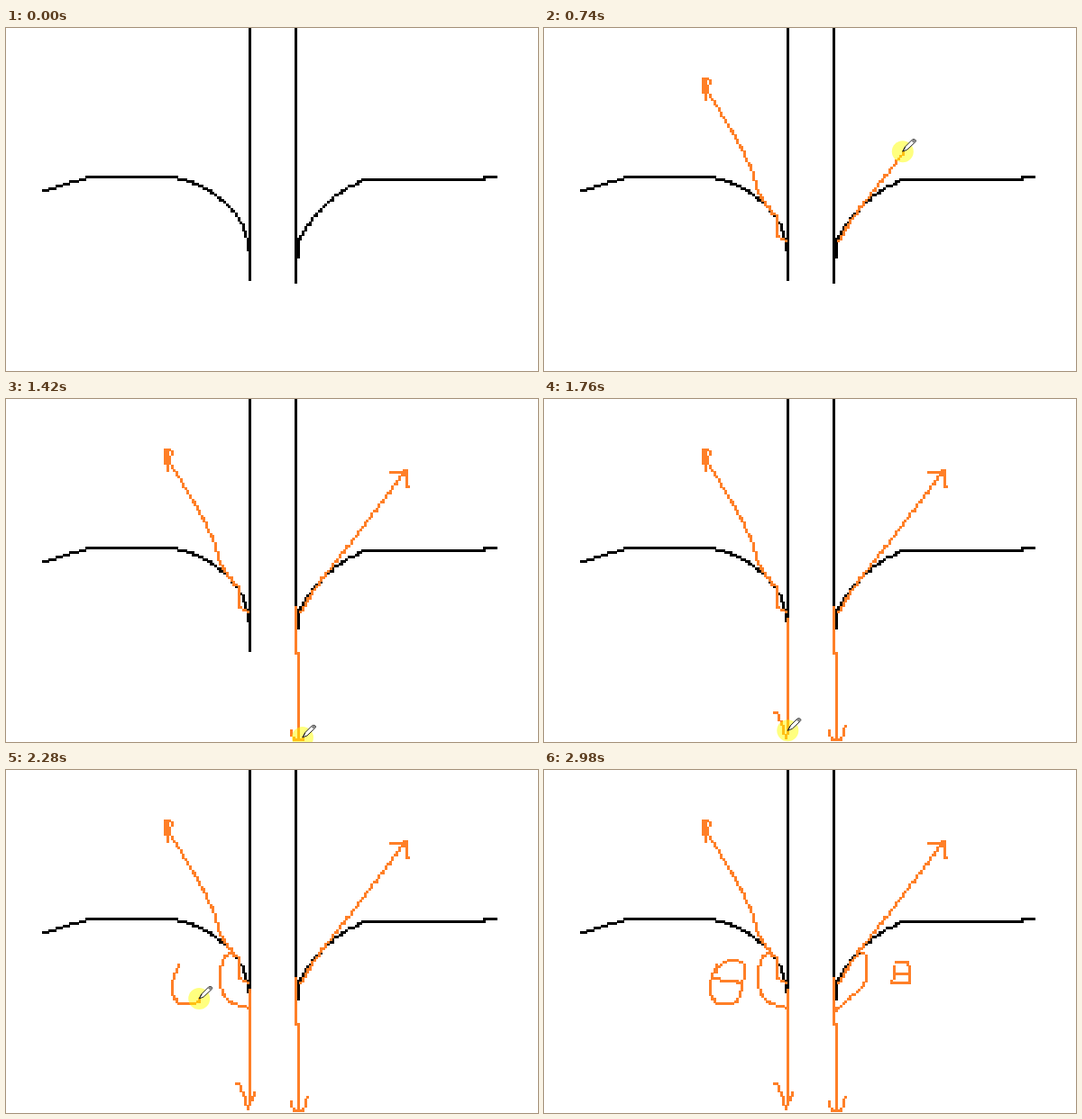
An HTML page with a canvas for the animation above (3040 ms loop, 590 px wide and 381 px high).

```html
<!DOCTYPE html>
<html lang="en">
<head>
<meta charset="utf-8">
<title>Angles sketch</title>
<style>
html, body { margin: 0; width: 100%; height: 100%; overflow: hidden; background: #fff; }
canvas { display: block; }
</style>
</head>
<body>
<canvas id="stage" width="590" height="381"></canvas>
<script>
const ctx = document.getElementById('stage').getContext('2d');
const LOOP = 3040, STEP = 20, HIDE = 2980;
const CELL_W = 2.55, CELL_H = 2.54;

// Walk along a curve and snap it to a connected chain of coarse grid cells.
function trace(d) {
  const path = document.createElementNS('http://www.w3.org/2000/svg', 'path');
  path.setAttribute('d', d);
  const length = path.getTotalLength(), steps = Math.ceil(length / CELL_H);
  const cells = [];
  for (let i = 0; i <= steps; i++) {
    const p = path.getPointAtLength(length * i / (steps || 1));
    const cell = [Math.round(p.x / CELL_W), Math.round(p.y / CELL_H)];
    if (String(cell) !== String(cells.at(-1))) cells.push(cell);
  }
  return cells;
}

const outline = [
  'M270 0V279',
  'M321 0V282',
  'M42 181Q75 169 96 165H184C225 172 268 205 268 246',
  'M324 255V238C326 226 358 182 398 168H530L532 165H544'
].map(trace);

const strokes = [];
const draw = (start, end, d) => strokes.push({ start, end, ink: true, cells: trace(d) });
const hover = (time, x, y) => strokes.push({
  start: time, end: time, ink: false, cells: [[x / CELL_W, y / CELL_H]]
});

// Upper left arrow
draw(20, 340, 'M267 236L257 230V209C240 190 235 180 230 157C222 137 200 100 178 66');
draw(350, 440, 'M178 78V56H175V70H180V64L176 55');
draw(450, 485, 'M178 56L183 58V62');
// Upper right arrow
draw(550, 860, 'M327 235Q345 204 366 180L443 79');
draw(890, 1000, 'M426 81H437L444 78V96H447');
hover(1060, 320, 192);
// Lower right arrow
draw(1120, 1340, 'M321 232V282H324V378');
draw(1360, 1450, 'M316 368L319 378H329L333 364');
// Lower left arrow
draw(1510, 1630, 'M270 243V372');
draw(1670, 1790, 'M256 348H259L268 377L270 366L276 362V357');
// Left angle and its theta
draw(1860, 2080, 'M252 203C236 204 238 222 238 236C238 256 252 260 270 264');
draw(2180, 2380, 'M192 217C182 228 180 254 192 258H210Q217 255 220 235C224 220 222 213 215 212H205Q194 214 190 224');
draw(2400, 2450, 'M188 231Q200 235 218 235');
// Right angle and its theta
draw(2490, 2607, 'M348 201Q357 202 357 214V234Q350 245 344 248L323 267');
draw(2650, 2760, 'M388 218L386 236H405V217L402 214H389');
draw(2780, 2820, 'M388 225H404');
hover(HIDE, 530, 371);

function paint(cells, color, count = cells.length) {
  ctx.fillStyle = color;
  for (const [x, y] of cells.slice(0, count))
    ctx.fillRect(Math.round(x * CELL_W - 1), Math.round(y * CELL_H - 1), 3, 3);
}

const tip = new Path2D('M0 0L3 -5');
const body = new Path2D('M0 0L2.5 -5L11 -13.5H13L14.5 -12.5V-11L5 -2Z');
const eraser = new Path2D('M9.5 -12L11 -13.5H13L14.5 -12.5V-11L12.5 -9Z');

function drawPencil(x, y, pressed) {
  ctx.save();
  ctx.translate(x, y);
  if (pressed) {
    ctx.fillStyle = 'rgba(255,255,0,.5)';
    ctx.beginPath();
    ctx.arc(0, 0, 12, 0, 2 * Math.PI);
    ctx.fill();
  }
  ctx.strokeStyle = '#222';
  ctx.fillStyle = '#fff';
  ctx.fill(body);
  ctx.stroke(body);
  ctx.stroke(tip);
  ctx.fillStyle = '#888';
  ctx.fill(eraser);
  ctx.restore();
}

// Follow the current stroke, or glide in a straight line to the next one.
function pencilAt(t) {
  const i = strokes.findIndex(s => t <= s.end);
  const { start, end, ink, cells } = strokes[i];
  if (t >= start) {
    const f = (t - start) / (end - start || 1);
    return [...cells[Math.floor(f * (cells.length - 1))], ink];
  }
  const prev = strokes[i - 1];
  const f = (t - prev.end) / (start - prev.end);
  return [...prev.cells.at(-1).map((v, axis) => v + (cells[0][axis] - v) * f), false];
}

function render(t) {
  ctx.fillStyle = '#fff';
  ctx.fillRect(0, 0, 590, 381);
  outline.forEach(cells => paint(cells, '#000'));
  for (const { start, end, ink, cells } of strokes) {
    if (!ink || t < start) continue;
    const f = Math.min(1, (t - start) / (end - start));
    paint(cells, '#ff7f27', 1 + Math.floor(f * (cells.length - 1)));
  }
  if (t >= STEP && t < HIDE) {
    const [x, y, pressed] = pencilAt(t);
    drawPencil(x * CELL_W, y * CELL_H, pressed);
  }
}

const origin = performance.now();
function tick() {
  const t = (performance.now() - origin) % LOOP;
  render(Math.floor(t / STEP) * STEP);
  requestAnimationFrame(tick);
}
tick();
</script>
</body>
</html>
```
